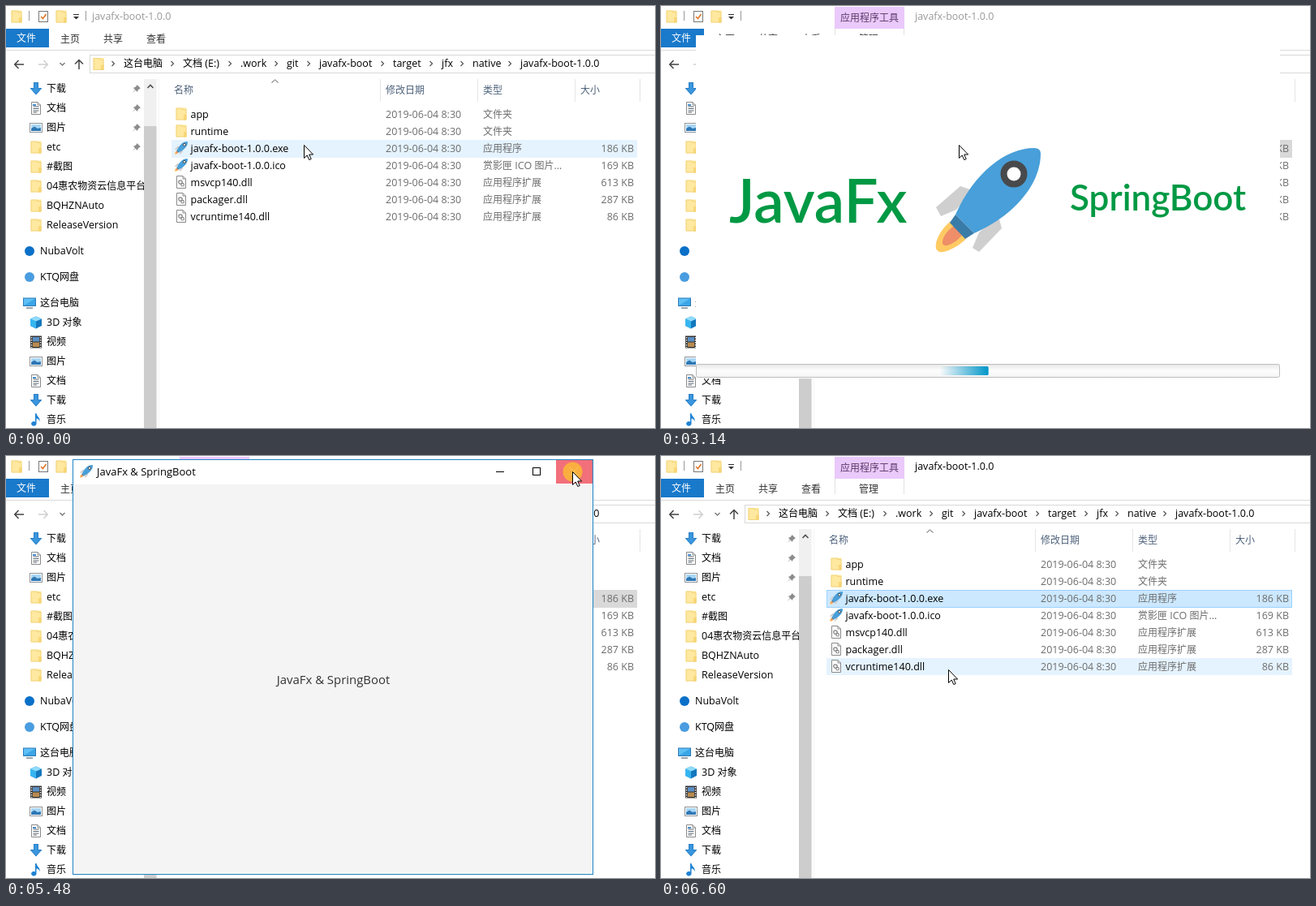
Animation of 800 by 520 pixels, one loop 6.85 s. Source, as an HTML page:

```html
<!DOCTYPE html>
<html lang="zh">
<head>
<meta charset="utf-8">
<title>javafx-boot</title>
<style>
html, body { margin: 0; width: 100%; height: 100%; overflow: hidden; background: #fff; }
svg { display: block; width: 100%; height: 100%; font: 12.5px "Open Sans", "Noto Sans CJK SC", "Noto Sans CJK", sans-serif; }
text { white-space: pre; }
.big { font-family: Lato, sans-serif; font-weight: 600; fill: #009944; }
</style>
</head>
<body>
<svg id="stage" viewBox="0 0 800 520"></svg>
<script>
const LOOP = 6850;

// ---- drawing helpers ----
const cjk = /[\u2e80-\u9fff]+/g;
const text = (x, y, s, fill = '#000', extra = '') =>
  `<text x="${x}" y="${y}" fill="${fill}" ${extra}>${s.replace(cjk, m => `<tspan font-size="12">${m}</tspan>`)}</text>`;
const rect = (x, y, w, h, fill, extra = '') =>
  `<rect x="${x}" y="${y}" width="${w}" height="${h}" fill="${fill}" ${extra}/>`;
const line = (d, stroke, w = 1, extra = '') =>
  `<path d="${d}" fill="none" stroke="${stroke}" stroke-width="${w}" ${extra}/>`;
const shape = (d, fill, extra = '') => `<path d="${d}" fill="${fill}" ${extra}/>`;
const at = (x, y, s) => `<g transform="translate(${x} ${y})">${s}</g>`;
const rocket = (x, y, size) =>
  `<use href="#rocket" transform="translate(${x} ${y}) scale(${size / 130}) translate(-338 -175)"/>`;

// ---- icons, each in a 16 x 16 box ----
const page = shape('M2.5 .5H10L13.5 4V15.5H2.5Z', '#fff', 'stroke="#8a8a8a"') + line('M10 .5V4H13.5', '#8a8a8a');
const icons = {
  folder: rect(1.5, .5, 13, 15, '#ffe89f') + shape('M11 9H14.5V15.5H11Z', '#f8d775') +
    line('M2 1H9.5V2.5H14V15H2Z', '#efd074', .8),
  down: shape('M5 0H11V7H15.5L8 15.5L.5 7H5Z', '#3a96dd') + line('M5.5 .5H10.5V7.5H14.5L8 14.8L1.5 7.5H5.5Z', '#2378c0', .8),
  doc: page + line('M4.5 6H11.5M4.5 8.5H11.5M4.5 11H11.5M4.5 13H9', '#5b6670') + rect(4, 3, 4, 2, '#4b8fd0'),
  pic: rect(.5, 2.5, 15, 11, '#fff', 'stroke="#8f9499"') + rect(2, 4, 12, 8, '#a9d6f5') +
    shape('M2 12V9L6 6.5L10 9L14 8V12Z', '#2e78b5'),
  dll: page + `<circle cx="7" cy="8" r="2.2" fill="none" stroke="#888" stroke-width="1.3"/>
    <circle cx="9.6" cy="11.2" r="1.8" fill="none" stroke="#888" stroke-width="1.2"/>`,
  cube: shape('M8 .5L15 3.5V12L8 15.5L1 12V3.5Z', '#1478bd') + shape('M1 3.5L8 6.5V15.5L1 12Z', '#35b6f1') +
    shape('M1 3.5L8 .5L15 3.5L8 6.5Z', '#8edcfb'),
  film: rect(1, .5, 14, 15, '#333') + rect(4, 2, 8, 5.5, '#5b8fc4') + rect(4, 8.5, 8, 5.5, '#b88b50') +
    line('M2.5 2V15M13.5 2V15', '#fff', 1.4, 'stroke-dasharray="1.5 1.5"'),
  note: shape('M7 0H8.5C9 4 13.5 5 12.5 10C12 7.5 10 6.5 8.5 6.5V12.5A3.2 2.8 0 1 1 7 10.3Z', '#1f83d3'),
  pc: rect(0, 1.5, 16, 10.5, '#2a7ab8') + rect(1, 2.5, 14, 8.5, '#5ec0f5') + shape('M1 11L15 2.5V11Z', '#3ba6e6') +
    rect(4, 13.5, 8, 1.2, '#5b6d7a'),
  disc: '<circle cx="8" cy="8" r="6" fill="#0a70c8"/>',
  paleDisc: '<circle cx="8" cy="8" r="6" fill="#4a9de0"/>',
  app: rocket(0, 0, 16),
  pin: shape('M6.5 1L11 5.5L9.5 6L7.5 8L7 10L4.5 7.5L1 11L4 7L1.8 4.8L4 4.2L6 2.2Z', '#8c8c8c'),
};
const icon = (name, x, cy) => at(x, cy - 8, icons[name]);

// ---- file list ----
const files = [
  ['folder', 'app', '文件夹'],
  ['folder', 'runtime', '文件夹'],
  ['app', 'javafx-boot-1.0.0.exe', '应用程序', 186],
  ['app', 'javafx-boot-1.0.0.ico', '赏影匣 ICO 图片...', 169],
  ['dll', 'msvcp140.dll', '应用程序扩展', 613],
  ['dll', 'packager.dll', '应用程序扩展', 287],
  ['dll', 'vcruntime140.dll', '应用程序扩展', 86],
];
const rowY = i => 133 + 21 * i;
const GREY = '#6d6d6d';
const fileRows = files.map(([ic, name, type, kb], i) => {
  const y = rowY(i), b = y + 5;
  return icon(ic, 208, y) + text(227.5, b, name) + text(468, b, '2019-06-04 8:30', GREY) +
    text(588, b, type, GREY) + (kb ? text(774, b, kb + ' KB', GREY, 'text-anchor="end"') : '');
}).join('');

const headers = [['名称', 207, 461], ['修改日期', 468, 581], ['类型', 588, 701], ['大小', 708, 781]]
  .map(([s, x, sep]) => text(x, 108, s, '#4c607a') + rect(sep, 90, 1, 28, '#e5e5e5')).join('');

// ---- navigation pane ----
const nav = [
  ['down', '下载', 101], ['doc', '文档', 125], ['pic', '图片', 149], ['folder', 'etc', 173],
  ['folder', '#截图', 197], ['folder', '04惠农物资云信息平台', 221], ['folder', 'BQHZNAuto', 245],
  ['folder', 'ReleaseVersion', 269], ['disc', 'NubaVolt', 301, 1], ['paleDisc', 'KTQ网盘', 333, 1],
  ['pc', '这台电脑', 365, 1], ['cube', '3D 对象', 389], ['film', '视频', 413], ['pic', '图片', 437],
  ['doc', '文档', 461], ['down', '下载', 485], ['note', '音乐', 509],
];
const navPane = `<g clip-path="url(#navClip)">` + nav.map(([ic, s, y, top], i) =>
  icon(ic, top ? 21 : 29, y + 1) + text(top ? 42 : 50, y + 5, s) + (i < 4 ? at(155, y - 5, icons.pin) : '')
).join('') + '</g>' +
  rect(170, 90, 15.5, 430, '#f0f0f0') + rect(170, 148, 15.5, 372, '#cdcdcd') + rect(188, 90, 1, 430, '#f5f5f5') +
  line('M174.5 101L178 97.5L181.5 101', '#505050', 1.6);

// ---- title, ribbon tabs and address bar ----
const crumbs = [['这台电脑', 145], ['文档 (E:)', 218], ['.work', 289], ['git', 346], ['javafx-boot', 386],
  ['target', 477], ['jfx', 537], ['native', 575], ['javafx-boot-1.0.0', 634]];
const topBars = icon('folder', 5, 13) + rect(28, 6, 1, 12, '#999') +
  rect(40.5, 6.5, 11, 13, '#fff', 'stroke="#777"') + line('M43 13L45.5 15.5L49.5 10', '#e0762a', 1.6) +
  icon('folder', 60, 13) + rect(83, 10, 7, 1, '#333') + shape('M83 13H90L86.5 16.5Z', '#333') + rect(98, 6, 1, 12, '#999') +
  rect(0, 28, 53, 23, '#1979ca') + text(13, 44, '文件', '#fff') +
  [['主页', 67], ['共享', 120], ['查看', 173]].map(([s, x]) => text(x, 45, s, '#333')).join('') +
  rect(0, 54, 800, 1, '#dadbdc') +
  line('M22 72H11M15.5 67L10.7 72L15.5 77', '#444', 1.5) + line('M40 72H51M46.5 67L51.3 72L46.5 77', '#d0d0d0', 1.5) +
  line('M66.5 70L69.5 73L72.5 70', '#777', 1.3) + line('M90 78V67M85 71.5L90 66.5L95 71.5', '#444', 1.5) +
  rect(103.5, 60.5, 720, 22, '#fff', 'stroke="#d9d9d9"') + icon('folder', 106, 71.5) +
  crumbs.map(([s, x]) => line(`M${x - 14.5} 68L${x - 11.5} 71L${x - 14.5} 74`, '#555', 1.2) + text(x, 75, s)).join('');

const toolTab = `<g id="toolTab">${rect(214, 1, 86, 27, '#eac9fb')}${text(221, 19, '应用程序工具', '#5a3a68')}
  ${line('M214.5 28V47M299.5 28V47', '#e2e2e2')}${text(244, 45, '管理', '#333')}</g>`;

// ---- splash and application window ----
const rocketArt = shape('M369 222L384 227L364 251L345 259L339 248Z', '#cfcfcf') +
  shape('M420 274L416 259L392 279L384 298L392 303Z', '#cfcfcf') +
  shape('M356 266C345 275 337 290 339 299Q341 304 348 303C356 302 369 294 376 287Z', '#ffca64') +
  shape('M361 271C351 278 346 287 347 293Q349 296 353 295C360 293 367 288 371 282Z', '#ef8e68') +
  shape('M460 175C424 175 385 207 363 257L386 280C436 258 468 219 468 182Q468 175 460 175Z', '#489fd9') +
  shape('M363 257L386 280L375 287L356 267Z', '#3a7ca8') +
  '<circle cx="435" cy="207" r="12.5" fill="#fff" stroke="#48494b" stroke-width="8"/>';

const splash = `<g id="splash">${rect(43, 36, 720, 423, '#fff')}
  ${text(84, 267, 'JavaFx', '', 'class="big" font-size="74.4"')}
  ${text(504, 252, 'SpringBoot', '', 'class="big" font-size="44"')}
  <use href="#rocket"/>
  ${rect(43.5, 441.5, 719, 16, 'url(#track)', 'rx="2" stroke="#bcbcbc"')}
  <g clip-path="url(#trackClip)">${rect(0, 444, 60, 11, 'url(#cometFill)', 'id="comet" rx="1.5"')}</g></g>`;

const appWindow = `<g id="win">${rect(82.5, 4.5, 641, 511, '#f4f4f4', 'stroke="#1f84c6"')}${rect(83, 5, 640, 30, '#fff')}
  ${rocket(91, 11, 16)}${text(112, 24, 'JavaFx &amp; SpringBoot', '#000', 'font-size="13"')}
  ${rect(604, 19, 10, 1, '#000')}${rect(649.5, 14.5, 9, 9, 'none', 'stroke="#000"')}
  ${rect(678, 5, 45, 29, '#fff', 'id="closeBtn"')}${line('M695 14L705 24M705 14L695 24', '#000', 1.1, 'id="cross"')}
  ${text(403.5, 281, 'JavaFx &amp; SpringBoot', '#333', 'font-size="14.9" text-anchor="middle"')}</g>`;

const pointer = `<g id="cursor"><circle id="click" r="12" cx=".5" cy=".5" fill="#fbb836" opacity=".86"/>
  <circle id="busy" cx="14.5" cy=".5" r="6.2" fill="none" stroke="#38a3e0" stroke-width="3.2"/>
  ${shape('M.5 .5V16.5L4.2 13L6.8 18.6L9.2 17.5L6.7 12H11.6Z', '#fff', 'stroke="#000"')}</g>`;

const stage = document.getElementById('stage');
stage.innerHTML = `<defs><g id="rocket">${rocketArt}</g>
  <clipPath id="navClip">${rect(0, 88, 170, 432, '#000')}</clipPath>
  <clipPath id="trackClip">${rect(45, 442, 716, 15, '#000')}</clipPath>
  <linearGradient id="track" x2="0" y2="1"><stop stop-color="#e8e8e8"/><stop offset=".5" stop-color="#fdfdfd"/><stop offset="1" stop-color="#f4f4f4"/></linearGradient>
  <linearGradient id="cometFill"><stop stop-color="#0096c9" stop-opacity="0"/><stop offset="1" stop-color="#0096c9"/></linearGradient></defs>
  ${rect(0, 0, 800, 520, '#fff')}${topBars}${toolTab}${text(106, 17, 'javafx-boot-1.0.0', '#999', 'id="caption"')}
  ${navPane}${headers}${line('M327.5 94.5L331.5 91L335.5 94.5', '#555')}
  ${rect(204, 0, 574, 21, '#e5f3ff', 'id="hover"')}${rect(204.5, 165.5, 573, 21, '#cce8ff', 'id="chosen"')}
  ${fileRows}${splash}${appWindow}${pointer}`;

// ---- motion ----
const el = id => document.getElementById(id);
const set = (id, attrs) => { for (const k in attrs) el(id).setAttribute(k, attrs[k]); };
const show = (id, on) => set(id, { display: on ? 'inline' : 'none' });
const clamp = v => Math.min(1, Math.max(0, v));
const part = (t, a, b) => clamp((t - a) / (b - a));
const smooth = u => u * u * (3 - 2 * u);

// Moments at which the picture refreshes: first, last, count.
const bursts = [[680, 940, 5], [1300, 1300, 1], [2000, 2450, 7], [2520, 2640, 3], [2710, 3390, 10], [3460, 3640, 4],
  [3710, 3880, 3], [4380, 5040, 11], [5090, 5090, 1], [5480, 6090, 10], [6160, 6160, 1], [6230, 6600, 6]];
function tick(t) {
  let now = 0;
  for (const [a, b, n] of bursts) {
    if (t < a) break;
    const dt = (b - a) / (n - 1) || 1;
    now = Math.min(b, a + Math.floor((t - a) / dt + 1e-6) * dt);
  }
  return now;
}

// Pointer path: start, end, target x, target y, easing.
const moves = [
  [4310, 5040, 699, 20, smooth],
  [5040, 5090, 698, 19, u => u],
  [5500, 6090, 431, 175, smooth],
  [6090, 6160, 420, 188, u => u],
  [6160, 6600, 354, 263, u => u * (1.6 - .6 * u)],
];
function pointerAt(t) {
  let x = 367, y = 171;
  for (const [a, b, tx, ty, ease] of moves) {
    const u = ease(part(t, a, b));
    x += (tx - x) * u;
    y += (ty - y) * u;
  }
  return [Math.round(x), Math.round(y)];
}

// Ease-both with 20% ramps, as the progress bar uses.
const easeBoth = u => u < .2 ? 3.125 * u * u : 1.25 * u - .125;

function fadeZoom(id, v, cx, cy) {
  const s = .9 + .1 * v;
  show(id, v > 0);
  set(id, { opacity: v, transform: `translate(${cx} ${cy}) scale(${s}) translate(${-cx} ${-cy})` });
}

function draw(time) {
  const t = tick(time), [x, y] = pointerAt(t);
  const picked = t >= 680, active = picked && (t < 2000 || t > 5500);

  show('toolTab', picked);
  set('caption', { x: picked ? 313 : 106, fill: active ? '#000' : '#999' });
  show('chosen', picked);
  set('chosen', { fill: active ? '#cce8ff' : '#d9d9d9', stroke: active ? '#99d1ff' : '#d9d9d9' });

  const row = Math.floor((y - 123) / 21);
  show('hover', !picked || (t > 6090 && row > 2 && row < 7));
  set('hover', { y: 123 + 21 * row, height: row === 2 ? 22 : 21 });

  fadeZoom('splash', t < 2000 ? 0 : 1 - part(t, 3400, 3620), 403, 247);
  set('comet', { x: 43 - 60 + 1560 * easeBoth(Math.max(0, t - 1948) / 4000) });

  const opening = 1 - (1 - part(t, 3640, 3860)) ** 2;
  fadeZoom('win', t < 5480 ? opening : 1 - part(t, 5490, 5720), 403, 260);
  const over = t < 5600 && x >= 678 && y < 34, pressed = t >= 5480;
  set('closeBtn', { fill: over ? (pressed ? '#f1707a' : '#e81123') : '#fff' });
  set('cross', { stroke: over ? '#fff' : '#000' });

  const clicking = (t >= 680 && t < 740) || (t >= 810 && t < 870) || (t >= 5480 && t < 5530);
  show('click', clicking);
  show('busy', t >= 940 && t < 1300);
  set('cursor', { transform: `translate(${x} ${y})` });
}

function loop() {
  draw(performance.now() % LOOP);
  requestAnimationFrame(loop);
}
loop();
</script>
</body>
</html>
```
